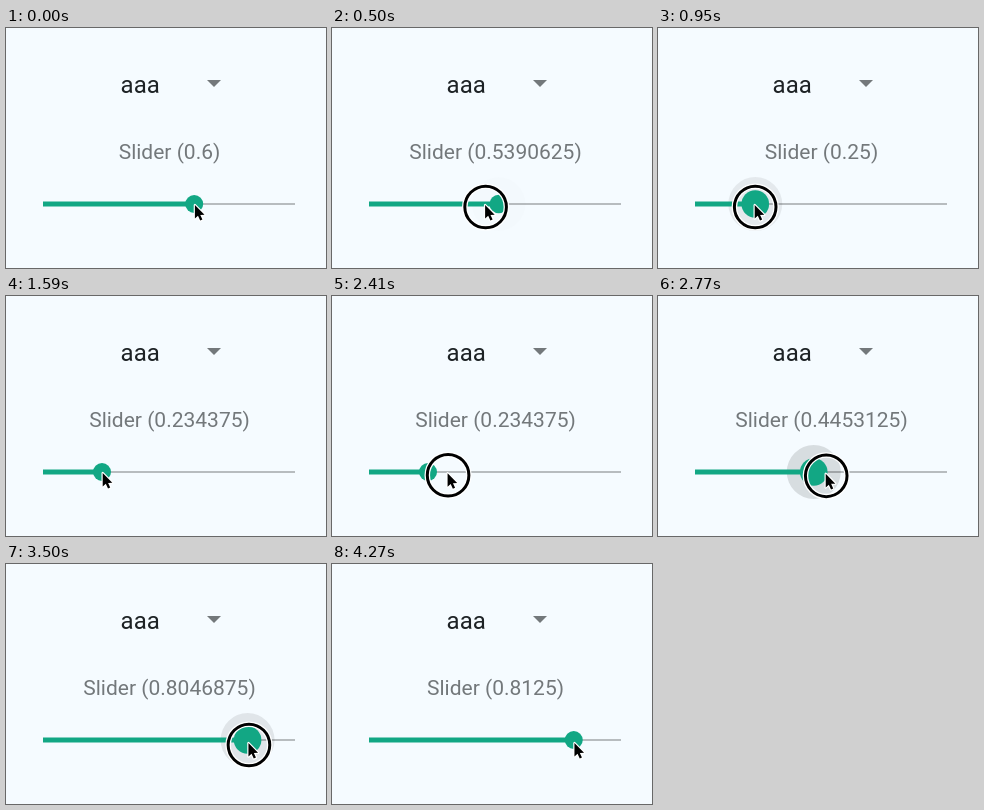
Recreate the animation shown at these times as an HTML page with a canvas. Size 320 by 240 pixels, loop 4460 ms.

```html
<!DOCTYPE html>
<html lang="en">
<head>
<meta charset="utf-8">
<title>Slider</title>
<style>
  html, body { margin: 0; width: 100%; height: 100%; overflow: hidden; background: #f5fbff; }
  canvas { display: block; width: 320px; height: 240px; }
</style>
</head>
<body>
<canvas id="stage"></canvas>
<script>
const LOOP = 4460;
const LEFT = 37, WIDTH = 252, TRACK_Y = 176;
const START = 0.6, STEPS = 128;
const GREEN = '#12a784', GRAY = '#73787b';

// Reaction times of the slider behind the pointer.
const THUMB_LAG = 80, TEXT_LAG = 120;

// The thumb stays put between press and grab.
const drags = [
  { press: 70, grab: 365, release: 850 },
  { press: 1950, grab: 2365, release: 3430 }
];

// Hand movements; they add up where they overlap.
const strokes = [
  { start: 182, time: 745, by: -92.2 },
  { start: 2127, time: 960, by: 94 },
  { start: 2969, time: 469, by: 51.75 }
];

const canvas = document.getElementById('stage');
const ctx = canvas.getContext('2d');
const ratio = window.devicePixelRatio || 1;
canvas.width = 320 * ratio;
canvas.height = 240 * ratio;
ctx.scale(ratio, ratio);

const ramp = (t, start, time) => Math.min(1, Math.max(0, (t - start) / time));
const ease = u => (1 - Math.cos(Math.PI * u)) / 2;
const pulse = (t, on, rise, off, fall) => ramp(t, on, rise) - ramp(t, off, fall);
const sum = (list, f) => list.reduce((total, item) => total + f(item), 0);

function pointerX(t) {
  return LEFT + START * WIDTH + sum(strokes, s => s.by * ease(ramp(t, s.start, s.time)));
}

function sliderX(t) {
  const held = drags.find(d => t > d.press && t < d.grab);
  return pointerX(held ? held.press : t);
}

function label(t) {
  if (t < drags[0].grab) return START;
  return Math.round((sliderX(t) - LEFT) / WIDTH * STEPS) / STEPS;
}

function disc(x, y, r, color) {
  ctx.fillStyle = color;
  ctx.beginPath();
  ctx.arc(x, y, r, 0, Math.PI * 2);
  ctx.fill();
}

function polygon(points) {
  ctx.beginPath();
  points.forEach(([x, y]) => ctx.lineTo(x, y));
  ctx.closePath();
}

function stroke(color, width) {
  ctx.strokeStyle = color;
  ctx.lineWidth = width;
  ctx.stroke();
}

function text(str, x, y, size, color, align) {
  ctx.font = size + 'px Roboto, sans-serif';
  ctx.textAlign = align;
  ctx.fillStyle = color;
  ctx.fillText(str, x, y);
}

function drawSlider(t) {
  const x = sliderX(t - THUMB_LAG);
  const halo = sum(drags, d => pulse(t, d.grab + 130, 120, d.release, 250));
  const grow = sum(drags, d => pulse(t, d.grab + 130, 120, d.release + 210, 530));
  ctx.fillStyle = '#a8adb0';
  ctx.fillRect(x, TRACK_Y - 0.8, LEFT + WIDTH - x, 1.6);
  disc(x, TRACK_Y, 27, `rgba(0,0,0,${0.12 * halo})`);
  ctx.fillStyle = GREEN;
  ctx.fillRect(LEFT, TRACK_Y - 2.5, x - LEFT, 5);
  disc(x, TRACK_Y, 9 + 4.8 * grow, GREEN);
}

function drawPointer(t) {
  const ring = sum(drags, d => pulse(t, d.press, 130, d.release + 230, 180));
  ctx.save();
  ctx.translate(pointerX(t) + 0.7, 177 + 2 * ramp(t, 2250, 1250));
  if (ring > 0) {
    ctx.globalAlpha = ring;
    ctx.beginPath();
    ctx.arc(0.5, 2, 20.8 + 2 * (1 - ring), 0, Math.PI * 2);
    stroke('#fff', 5.6);
    stroke('#000', 3);
    ctx.globalAlpha = 1;
  }
  polygon([[0, 0], [0, 13.6], [3.1, 10.8], [5.3, 15.6], [7.5, 14.6], [5.4, 9.9], [9.6, 9.8]]);
  ctx.lineJoin = 'round';
  stroke('#fff', 2.4);
  ctx.fillStyle = '#000';
  ctx.fill();
  ctx.restore();
}

function draw(t) {
  ctx.fillStyle = '#f5fbff';
  ctx.fillRect(0, 0, 320, 240);
  text('aaa', 114.6, 65, 24, '#1d2225', 'left');
  polygon([[201, 52], [215, 52], [208, 59]]);
  ctx.fillStyle = GRAY;
  ctx.fill();
  text(`Slider (${label(t - TEXT_LAG)})`, 163.5, 131, 21, GRAY, 'center');
  drawSlider(t);
  drawPointer(t);
}

const begin = performance.now();
function tick() {
  draw((performance.now() - begin) % LOOP);
  requestAnimationFrame(tick);
}
tick();
</script>
</body>
</html>
```
